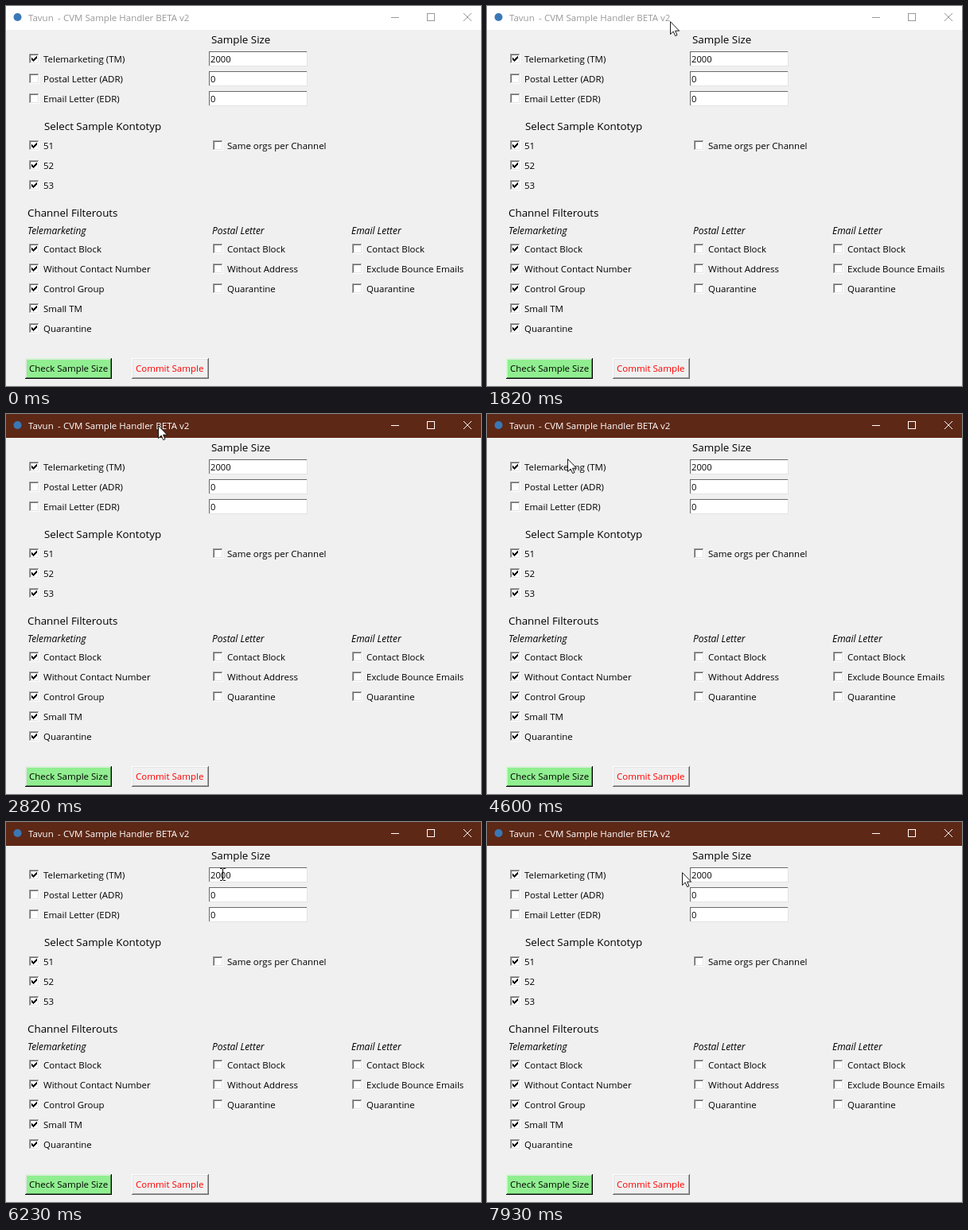
These frames come from a looping animation (597x478 px, 8000 ms). An HTML page:

```html
<!DOCTYPE html>
<html lang="en">
<head>
<meta charset="utf-8">
<title>Sample Handler</title>
<style>
  html, body { margin: 0; width: 100%; height: 100%; overflow: hidden; background: #f0f0f0; }
  svg { display: block; }
  text { font: 11.5px "Open Sans", "Noto Sans", sans-serif; white-space: pre; }
  .head { font-size: 13.4px; }
  .col { font-size: 12px; font-style: italic; }
  .num { font-size: 11.2px; }
  .crisp { shape-rendering: crispEdges; }
</style>
</head>
<body>
<svg id="stage" width="597" height="478" viewBox="0 0 597 478">
  <rect width="597" height="478" fill="#f0f0f0"/>
  <rect id="bar" width="597" height="30" fill="#fff"/>
  <circle cx="14.5" cy="14" r="5" fill="#3a78b5"/>
  <g id="caption" fill="#999">
    <text x="28" y="19">Tavun</text>
    <text x="65" y="19">-</text>
    <text x="72" y="19">CVM Sample Handler BETA v2</text>
  </g>
  <g id="controls" fill="none" stroke="#999">
    <path class="crisp" d="M484 14.5h10M529.5 9.5h9v9h-9z"/>
    <path d="M575 9l10 10M585 9l-10 10"/>
  </g>
  <g id="form"></g>
  <circle id="click" cx="230" cy="19" r="12" fill="#ff0" fill-opacity=".47"/>
  <g id="cursor">
    <path id="arrow" d="M.5.7V16.6L4.2 13.1 6.7 18.6 9 17.6 6.6 12.2H11.6Z" fill="#fff" stroke="#000" stroke-width=".9"/>
    <path id="beam" class="crisp" d="M-3 -7.5h3M1 -7.5h3M.5 -7V7M-3 7.5h3M1 7.5h3" fill="none" stroke="#000"/>
  </g>
</svg>
<script>
const $ = id => document.getElementById(id);

function add(tag, attrs, content = '') {
  const el = document.createElementNS('http://www.w3.org/2000/svg', tag);
  for (const name in attrs) el.setAttribute(name, attrs[name]);
  el.textContent = content;
  $('form').append(el);
}

const label = (x, y, str, cls = '', fill = '#000') => add('text', { x, y, class: cls, fill }, str);

// 3D edge: one [top-left, bottom-right] colour pair per pixel, from outside in
function bevel(x, y, w, h, fill, edges) {
  add('rect', { x, y, width: w, height: h, fill, class: 'crisp' });
  const line = (d, stroke) => add('path', { d, stroke, fill: 'none', class: 'crisp' });
  edges.forEach(([tl, br], i) => {
    const l = x + i, t = y + i, r = x + w - i, b = y + h - i;
    line(`M${l} ${b - .5}H${r - .5}V${t}`, br);
    line(`M${l + .5} ${b - 1}V${t + .5}H${r - 1}`, tl);
  });
}

const SUNKEN = [['#a0a0a0', '#fff'], ['#696969', '#e3e3e3']];
const THIN = [['#696969', '#e3e3e3']];
const RAISED = [['#fff', '#696969'], ['#e3e3e3', '#a0a0a0']];
const RAISED_GREEN = [['#c9ffc9', '#000'], ['#e3e3e3', '#568f56']];

function check(x, mid, str, on) {
  bevel(x, mid - 6, 13, 13, '#fff', SUNKEN);
  if (on) add('path', { d: `M${x + 3} ${mid - 1}l2 2 5 -5v3l-5 5 -2 -2z`, fill: '#000', class: 'crisp' });
  label(x + 18, mid + 5, str);
}

function entry(mid, str) {
  bevel(255, mid - 9, 124, 19, '#fff', THIN);
  label(257, mid + 5, str, 'num');
}

function button(x, w, str, fill, ink, edges) {
  bevel(x, 443, w, 26, fill, edges);
  label(x + 5, 460, str, '', ink);
}

const column = (x, top, names, on) => names.forEach((s, i) => check(x, top + 25 * i, s, on));

label(258, 47, 'Sample Size', 'head');
check(29, 66, 'Telemarketing (TM)', true);
column(29, 91, ['Postal Letter (ADR)', 'Email Letter (EDR)'], false);
['2000', '0', '0'].forEach((s, i) => entry(66 + 25 * i, s));

label(48, 156, 'Select Sample Kontotyp', 'head');
column(29, 175, ['51', '52', '53'], true);
check(260, 175, 'Same orgs per Channel', false);

label(27, 265, 'Channel Filterouts', 'head');
label(27, 287, 'Telemarketing', 'col');
label(259, 287, 'Postal Letter', 'col');
label(434, 287, 'Email Letter', 'col');
column(29, 305, ['Contact Block', 'Without Contact Number', 'Control Group', 'Small TM', 'Quarantine'], true);
column(260, 305, ['Contact Block', 'Without Address', 'Quarantine'], false);
column(435, 305, ['Contact Block', 'Exclude Bounce Emails', 'Quarantine'], false);

button(24, 109, 'Check Sample Size', '#90ee90', '#000', RAISED_GREEN);
button(158, 97, 'Commit Sample', '#f0f0f0', '#f00', RAISED);

// Pointer moves: first step, last step, step count, x, y
const LOOP = 8000;
const MOVES = [
  [510, 1210, 10, 234, 35],
  [1670, 1820, 3, 230, 19],
  [2530, 2820, 5, 191, 14],
  [4290, 4990, 10, 61, 74],
  [5140, 5460, 5, 146, 80],
  [5920, 6230, 5, 272, 66],
  [6780, 7084, 5, 237, 59],
  [7160, 7540, 6, 294, 62],
  [7620, 7775, 3, 229, 60],
  [7852, 7930, 2, 245, 63]
];
const easeOut = u => 1 - (1 - u) ** 1.7;

function pointer(t) {
  let x = 503, y = 525;
  for (const [from, to, n, tx, ty] of MOVES) {
    if (t < from) break;
    const gap = (to - from) / (n - 1);
    const p = easeOut(Math.min(n, Math.floor((t - from + 4) / gap) + 1) / n);
    x += (tx - x) * p;
    y += (ty - y) * p;
  }
  return [Math.round(x), Math.round(y)];
}

function draw(t) {
  const active = t >= 2050;
  $('bar').setAttribute('fill', active ? '#5e2816' : '#fff');
  $('caption').setAttribute('fill', active ? '#fff' : '#999');
  $('controls').setAttribute('stroke', active ? '#fff' : '#999');
  $('click').style.display = active && t < 2280 ? '' : 'none';

  const [x, y] = pointer(t);
  const typing = x >= 255 && x < 379 && y >= 57 && y < 76;
  $('cursor').setAttribute('transform', `translate(${x} ${y})`);
  $('arrow').style.display = typing ? 'none' : '';
  $('beam').style.display = typing ? '' : 'none';
}

const start = performance.now();
function tick() {
  draw((performance.now() - start) % LOOP);
  requestAnimationFrame(tick);
}
tick();
</script>
</body>
</html>
```
